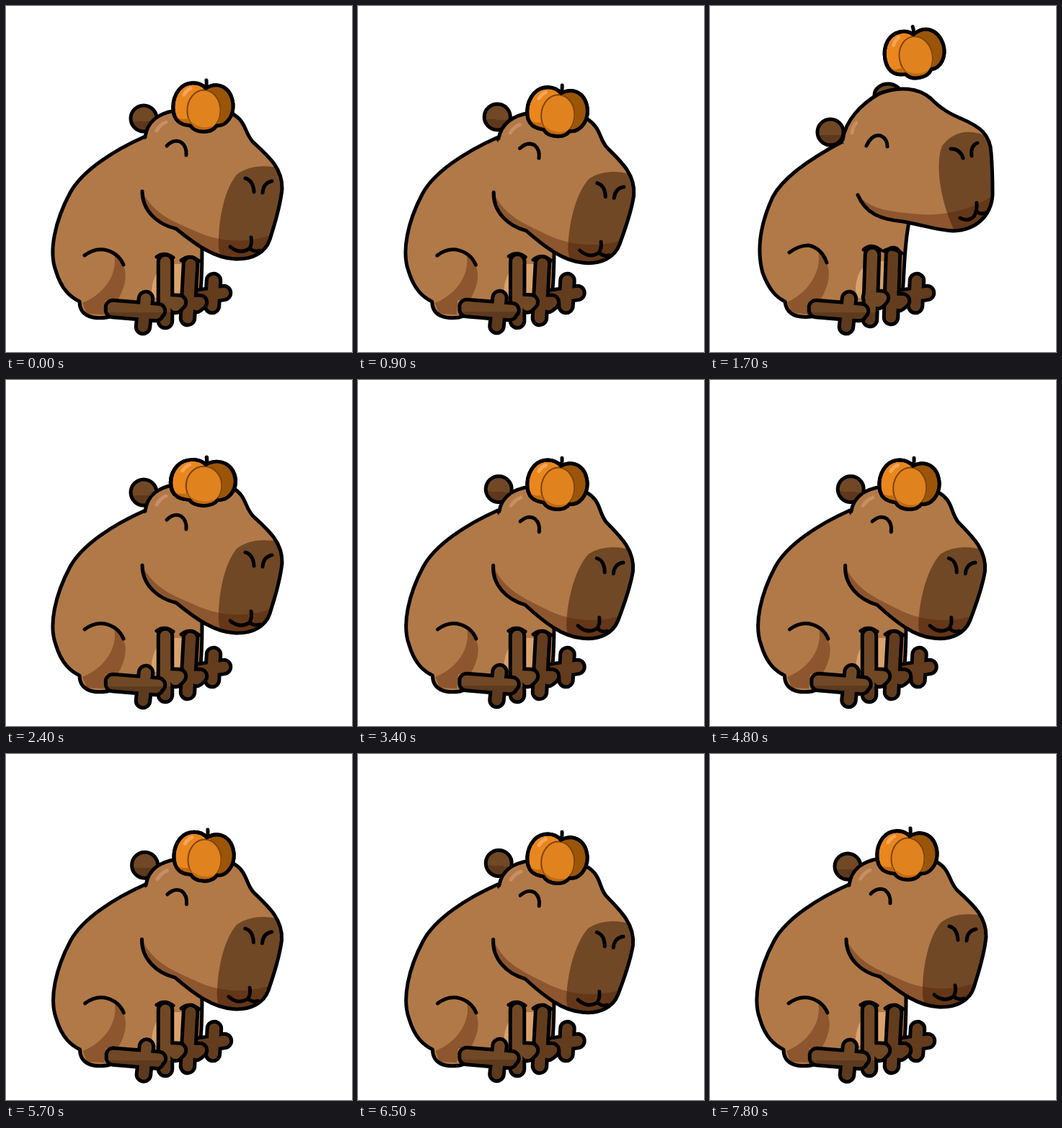
An HTML page that plays this animation: 480x480 px, repeating every 7.9 s.

```html
<!DOCTYPE html>
<html lang="en">
<head>
<meta charset="utf-8">
<title>Capybara and pumpkin</title>
<style>
html, body { margin: 0; width: 100%; height: 100%; overflow: hidden; background: #fff; }
svg { display: block; width: 100vw; height: 100vh; }
path, ellipse { fill: none; stroke-linecap: round; stroke-linejoin: round; }
.ink { stroke: #000; stroke-width: 5; }
.fur { fill: #b17947; }
.dark { fill: #704825; }
.shade { fill: rgb(80 25 5 / .37); }
.ear { fill: url(#earTone); }
.rim { stroke: #000; stroke-width: 24.5; }
.limb { stroke-width: 14.5; }
</style>
</head>
<body>
<svg viewBox="0 0 480 480">
  <defs>
    <linearGradient id="limbTone" gradientUnits="userSpaceOnUse" x1="0" y1="330" x2="0" y2="460">
      <stop offset=".73" stop-color="#704825"/><stop offset=".73" stop-color="#5d3a1d"/>
    </linearGradient>
    <linearGradient id="earTone" x1="0" y1="0" x2="0" y2="1">
      <stop offset=".6" stop-color="#704825"/><stop offset=".6" stop-color="#5d381d"/>
    </linearGradient>
    <clipPath id="inHead"><path id="headClip"/></clipPath>
  </defs>
  <g id="upper">
    <g id="ears">
      <ellipse id="backEar" class="ink ear" rx="19" ry="16"/>
      <ellipse id="frontEar" class="ink ear" rx="18" ry="18"/>
    </g>
    <g id="body"></g>
    <g id="head">
      <g id="face"></g>
      <g id="pumpkin">
        <path class="ink" d="M277 113Q279 108 278 103"/>
        <path id="rind" class="ink" style="fill:#e9861d" d="M277 114C268 104 250 104 240 116C229 130 229 152 240 161C247 166 252 165 256 166C262 176 284 178 292 166C306 167 316 152 315 136C312 112 294 104 277 114Z"/>
        <path style="fill:#9a5508" d="M277 114C294 104 312 112 315 136C316 152 306 167 292 166C304 150 300 125 277 114Z"/>
        <ellipse cx="274.5" cy="145" rx="23" ry="28.5" style="fill:#e0821e;stroke:#804500;stroke-width:2"/>
        <path style="fill:#c2690f" d="M235 153Q244 159 253 156L256 163C262 176 284 178 292 164Q274 174 257 161L256 166Q243 167 235 153Z"/>
        <path d="M247 123Q250 117 256 114" style="stroke:#f7a45a;stroke-width:5"/>
        <use href="#rind" style="fill-opacity:0"/>
      </g>
    </g>
  </g>
  <g id="backFoot"></g>
  <g id="legs"></g>
  <g id="frontFoot"></g>
</svg>
<script>
const LOOP = 7900, STEP = 100;
const $ = id => document.getElementById(id);
const parts = [];

// Path that blends from its resting shape to its raised-head shape.
function part(parent, cls, rest, raised = rest, style = '') {
  const el = document.createElementNS('http://www.w3.org/2000/svg', 'path');
  el.setAttribute('class', cls);
  el.style.cssText = style;
  $(parent).append(el);
  parts.push({ el, rest, raised });
}
function limb(parent, color, rest, raised) {
  part(parent, 'rim', rest, raised);
  part(parent, 'limb', rest, raised, 'stroke:' + color);
}

part('body', 'ink fur',
  'M193 181C150 200 106 228 89 259C68 298 59 340 69 367C77 394 90 404 102 410C102 430 120 435 140 432L200 414L268 408C272 390 272 360 272 335L240 250Z',
  'M184 188C146 208 102 236 87 265C69 304 65 340 73 370C82 394 92 404 104 410C106 428 120 433 140 431L200 414L266 408C270 380 268 340 276 300L250 230Z');
part('body', '', 'M202 396C203 376 212 362 226 358L245 358L245 405L203 405Z',
  'M202 393C203 371 212 358 226 354L245 354L245 405L203 405Z', 'fill:#d9a26c');
part('body', 'shade', 'M150 343C156 372 136 400 106 412L112 427L136 428L138 408L155 408C164 392 170 375 162 358Z',
  'M150 339C156 368 136 398 107 411L113 425L136 428L138 408L153 408C164 390 169 371 161 354Z');
part('body', 'ink', 'M109 346Q122 336 136 338Q156 342 163 359', 'M110 342Q123 332 137 332Q155 336 162 356');

const headRest = 'M193 182C196 159 212 149 235 145C262 140 294 140 315 150C334 161 331 177 343 189C365 209 384 226 383 254C380 282 372 304 366 324C360 342 342 352 318 351C290 350 264 332 236 309C210 303 189 284 189 257';
const headRaised = 'M184 186C188 158 210 136 234 122C262 110 290 114 306 128C322 144 334 150 348 156C374 167 389 178 390 204C392 228 392 244 392 262C390 292 368 311 338 312C314 311 292 303 268 299C236 296 216 288 205 262';
parts.push({ el: $('headClip'), rest: headRest, raised: headRaised });
part('face', 'fur', headRest, headRaised);
$('face').insertAdjacentHTML('beforeend', '<g id="tones" clip-path="url(#inHead)"></g>');
part('tones', 'dark', 'M390 228C360 218 336 222 320 234C302 256 294 300 295 335C296 345 300 352 304 360L390 360Z',
  'M392 186C366 168 338 172 322 194C314 214 317 250 328 284C332 296 336 306 342 318L400 318Z');
part('tones', 'shade', 'M189 257C205 290 235 300 262 312C300 330 340 328 370 317L366 360L300 360L180 300Z',
  'M205 262C222 282 250 285 280 288C320 293 360 285 394 262L395 320L300 320L200 300Z');
part('face', 'ink', headRest, headRaised);
part('face', '', 'M209 173Q214 164 222 161', 'M197 176Q198 167 203 162', 'stroke:#c98e66;stroke-width:5');
const lines = [
  ['M223 194Q233 184 243 189Q251 195 250 207', 'M217 194Q225 177 237 180Q246 184 246 195'],
  ['M332 239Q343 242 344 258', 'M334 198Q347 198 351 211'],
  ['M369 243Q357 245 356 259', 'M371 190Q361 194 363 208'],
  ['M311 334Q324 345 337 337Q342 331 340 321', 'M347 294Q358 300 366 292Q371 284 370 273'],
  ['M338 336Q344 342 352 339', 'M369 284Q374 290 382 287']
];
for (const [rest, raised] of lines) part('face', 'ink', rest, raised);

const near = 'url(#limbTone)', far = '#633c1e';
limb('backFoot', far, 'M265 404L302 398M288 381L286 416M268 408L286 402');
limb('legs', far, 'M256 358L252 433M253 411L269 411L264 415', 'M254 345L251 432M253 409L267 409L262 413');
part('legs', 'ink', 'M243 353Q255 343 268 354', 'M241 340Q253 333 266 343');
limb('legs', near, 'M221 355L221 437M221 410L240 411L235 416', 'M225 345L222 435M222 404L238 405L233 410');
part('legs', 'ink', 'M209 348Q220 340 232 349', 'M213 338Q224 328 237 339');
limb('frontFoot', near, 'M148 418L211 423M148 422L208 427M194 406L190 445');

const mix = (a, b, k) => a + (b - a) * k;

function blend(rest, raised, k) {
  const to = raised.match(/[\d.]+/g);
  let i = 0;
  return rest.replace(/[\d.]+/g, n => mix(+n, +to[i++], k).toFixed(2));
}

// Eased value at time t from [time, value] pairs.
function at(t, keys) {
  const i = keys.findIndex(k => k[0] > t);
  if (i < 0) return keys[keys.length - 1][1];
  if (i === 0) return keys[0][1];
  const [t0, v0] = keys[i - 1], [t1, v1] = keys[i];
  return mix(v0, v1, (1 - Math.cos(Math.PI * (t - t0) / (t1 - t0))) / 2);
}

const raise = [[850, 0], [1150, 1], [1700, 1], [2200, 0]];
const nod = [[200, 0], [650, 1.5], [850, 1.2], [1050, 0], [2450, 0], [2900, 1], [3400, 1], [4100, 0],
  [4750, 1], [5350, 1], [5950, 0], [6500, 1], [7400, 1], [7800, 0]];
const crouch = [[200, 0], [700, 1], [1000, 0]];
const squash = [[2050, 0], [2200, 1.6], [2400, 1], [2600, 0]];
const TOSS = 944, CATCH = 2056;

const move = (id, transform) => $(id).setAttribute('transform', transform);

// Scale about a fixed point.
const stretch = (x, y, sx, sy) => `translate(${x} ${y}) scale(${sx} ${sy}) translate(${-x} ${-y})`;

function place(id, x, y) {
  $(id).setAttribute('cx', x);
  $(id).setAttribute('cy', y);
}

function draw(t) {
  const up = at(t, raise), down = at(t, nod), low = at(t, crouch), flat = at(t, squash);
  for (const p of parts) p.el.setAttribute('d', blend(p.rest, p.raised, up));

  const tilt = `rotate(${3.2 * down} 184 232)`;
  move('head', tilt);
  move('ears', `translate(0 ${-5 * down}) ${tilt}`);
  place('frontEar', mix(191, 167, up), mix(156, 175, up));
  place('backEar', mix(256, 247, up), mix(166, 124, up));
  move('body', stretch(272, 432, 1 - .0085 * down, 1));
  move('upper', stretch(272, 432, 1 + .02 * low, 1 - .02 * low));

  const flying = t > TOSS && t < CATCH;
  const lift = flying ? -85 + 11 * ((t - 1500) / 200) ** 2 : 0;
  const swing = flying ? Math.sin(Math.PI * (t - TOSS) / (CATCH - TOSS)) : 0;
  move('pumpkin', `translate(${12 * swing - 2 * down} ${lift}) rotate(${-13 * swing} 273 139) ` +
    stretch(273, 175, 1 + .08 * flat, 1 - .055 * flat));

  const slide = 2.5 * down - up;
  move('backFoot', `translate(${slide} 0)`);
  move('frontFoot', `translate(${slide} ${-down})`);
}

function frame() {
  draw(Math.floor(performance.now() % LOOP / STEP) * STEP);
  requestAnimationFrame(frame);
}
frame();
</script>
</body>
</html>
```
